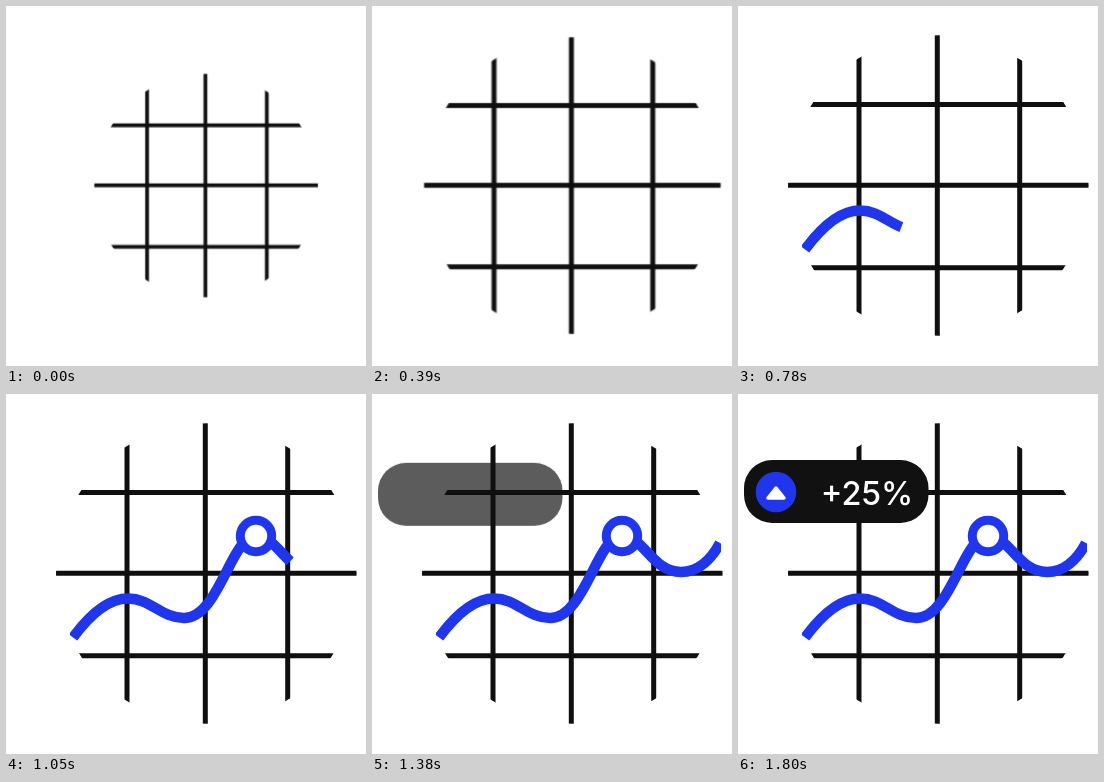
Write an HTML page that moves like this. It is 360x360 px and loops after 1.83 s.

```html
<!DOCTYPE html>
<html lang="en">
<head>
<meta charset="utf-8">
<title>Growth chart</title>
<style>
  html, body { margin: 0; width: 100%; height: 100%; overflow: hidden; background: #fff; }
  svg { display: block; width: 100vw; height: 100vh; }

  .grid, .curve, .ring, .pill, .badge, .label {
    animation: 1830ms cubic-bezier(.3333, 0, .6667, 1) infinite;
  }
  .grid  { animation-name: grow; transform-origin: 199.5px 179.5px; }
  .curve { animation-name: draw; stroke-dasharray: 1 2; }
  .ring  { animation-name: ring; transform-origin: 250px 142px; }
  .pill  { animation-name: pill; }
  .badge { animation-name: badge; transform-origin: 38px 98px; }
  .label { animation-name: label; }

  @keyframes grow {
    0% { transform: scale(.745); }
    24.6%, 100% { transform: none; }
  }
  @keyframes draw {
    0%, 25.68% { stroke-dashoffset: 1.005; }
    70.93%, 100% { stroke-dashoffset: 0; }
  }
  @keyframes ring {
    0%, 50.82% { transform: scale(0); }
    56.56%, 100% { transform: none; }
  }
  @keyframes pill {
    0%, 67.76% { opacity: 0; transform: translateY(9px); }
    80.05%, 100% { opacity: 1; transform: none; }
  }
  @keyframes badge {
    0%, 78.69% { opacity: 0; transform: scale(.5); }
    86.89%, 100% { opacity: 1; transform: none; }
  }
  @keyframes label {
    0%, 81.97% { opacity: 0; }
    91.8%, 100% { opacity: 1; }
  }
</style>
</head>
<body>
<svg viewBox="0 0 360 360">
  <defs>
    <clipPath id="disc"><circle cx="200.3" cy="179.5" r="150.3"/></clipPath>
    <clipPath id="plot"><rect x="64" y="0" width="285" height="360"/></clipPath>
  </defs>

  <g class="grid">
    <path clip-path="url(#disc)" fill="none" stroke="#0f0f10" stroke-width="5"
      d="M40 98.5H360M40 179.3H360M40 261.7H360M121 20V340M199.3 20V340M281.7 20V340"/>
  </g>

  <g clip-path="url(#plot)">
    <path class="curve" pathLength="1" fill="none" stroke="#2036ec" stroke-width="10.5"
      d="M67 243.5C85 219 103 204.5 122 204.5C145 204.5 155 224 178 224
         C213 224 225 142 250 142C272 142 280 178 309 178C327 178 340 164 348 149"/>
  </g>
  <circle class="ring" cx="250" cy="142" r="15.7" fill="#fff" stroke="#2036ec" stroke-width="9"/>

  <rect class="pill" x="6" y="66" width="184.5" height="63" rx="28" fill="#111"/>
  <g class="badge">
    <circle cx="38" cy="98" r="20.3" fill="#2036ec"/>
    <path d="M38 94L46 104H30Z" fill="#fff" stroke="#fff" stroke-width="3.5" stroke-linejoin="round"/>
  </g>
  <text class="label" x="129" y="110.5" text-anchor="middle" fill="#fff"
    font-family="Inter, Arial, sans-serif" font-size="32.5" font-weight="500">+25%</text>
</svg>
</body>
</html>
```
